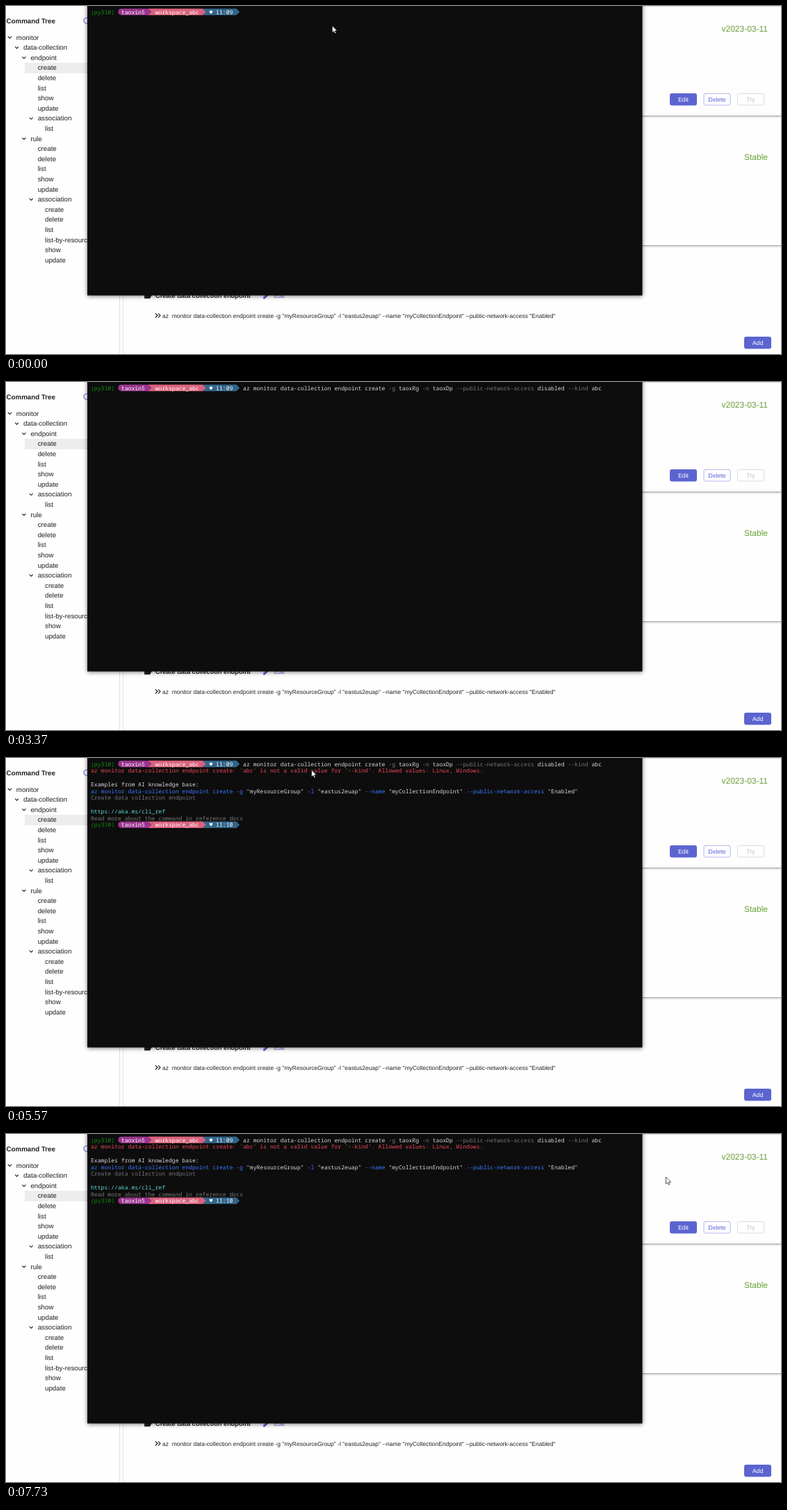
Recreate the animation shown at these times as an HTML page. Size 1115x502 px, loop 8000 ms.

```html
<!DOCTYPE html>
<html lang="en">
<head>
<meta charset="utf-8">
<title>Command tree and terminal</title>
<style>
  html, body { margin: 0; width: 100%; height: 100%; overflow: hidden; background: #fefefe; }
  svg { display: block; width: 1115px; height: 502px; }
  text { font-family: "Liberation Sans", Arial, sans-serif; white-space: pre; text-rendering: geometricPrecision; }
  #term text { font: 8.113px "Noto Sans Mono", "DejaVu Sans Mono", monospace; }
  #tree text { font-size: 9.75px; fill: #222; }
  #tree path, .line { fill: none; stroke: #222; stroke-width: 1.1; }
  .small { font-size: 8.8px; text-anchor: middle; }
  .tag { font-size: 12px; fill: #689f38; text-anchor: end; }
</style>
</head>
<body>
<svg viewBox="0 0 1115 502">
  <defs>
    <linearGradient id="fade" x2="0" y2="1">
      <stop stop-color="#999"/><stop offset=".4" stop-color="#ddd"/><stop offset="1" stop-color="#fefefe"/>
    </linearGradient>
    <filter id="shadow" x="-5%" y="-5%" width="110%" height="110%">
      <feDropShadow dx="0" dy="1" stdDeviation="3" flood-opacity=".55"/>
    </filter>
  </defs>

  <text x="0.5" y="24.5" font-size="9.75" font-weight="bold" fill="#222">Command Tree</text>
  <circle cx="116" cy="21" r="4" fill="none" stroke="#5c64d0" stroke-width="1.2"/>
  <rect x="27" y="82" width="136" height="15" fill="#ededed"/>
  <g id="tree"></g>
  <path d="M163.5 0V502M168.5 0V502" stroke="#e0e0e0"/>

  <g fill="url(#fade)">
    <rect x="169" y="0" width="946" height="2" opacity=".5"/>
    <rect x="169" y="158" width="946" height="4"/>
    <rect x="169" y="345" width="946" height="4"/>
  </g>
  <text class="tag" x="1096" y="37.3">v2023-03-11</text>
  <text class="tag" x="1096" y="222">Stable</text>
  <g id="buttons"></g>

  <path d="M199 413h8l3 4-3 5h-7q-1 0-1-1z" fill="#222"/>
  <text x="215" y="421" font-size="9.2" font-weight="bold" fill="#222">Create data collection endpoint</text>
  <path d="M370 422.500v-2.500l6-6 2.500 2.500-6 6z" fill="#5c64d0"/>
  <text class="small" x="393" y="421" fill="#5c64d0">Edit</text>
  <path class="line" d="M215 443.500l3 3-3 3M219 443.500l3 3-3 3"/>
  <text x="225" y="449.500" font-size="8.5" fill="#222">az  monitor data-collection endpoint create -g "myResourceGroup" -l "eastus2euap" --name "myCollectionEndpoint" --public-network-access "Enabled"</text>

  <rect x="117" y="-10" width="798.500" height="427.500" fill="#0c0c0c" filter="url(#shadow)"/>
  <g id="term"></g>
  <rect id="caret" width="1" height="10.500" fill="#eee"/>
  <path id="mouse" d="M0 0V10L2.300 7.900 3.800 11.200 5.400 10.500 3.900 7.300H7.100Z" fill="#fff" stroke="#111" stroke-width=".7"/>
</svg>
<script>
const $ = id => document.getElementById(id);

function add(parent, tag, attrs, text) {
  const el = document.createElementNS('http://www.w3.org/2000/svg', tag);
  for (const k in attrs) el.setAttribute(k, attrs[k]);
  if (text) el.textContent = text;
  return parent.appendChild(el);
}

// Command tree: leading dots give the depth, "+" marks an open branch
`+monitor
.+data-collection
..+endpoint
...create
...delete
...list
...show
...update
...+association
....list
..+rule
...create
...delete
...list
...show
...update
...+association
....create
....delete
....list
....list-by-resource
....show
....update`.split('\n').forEach((row, i) => {
  const [, dots, open, name] = row.match(/^(\.*)(\+?)(.*)/);
  const x = 14.8 + dots.length * 10.3, y = 45 + i * 14.6;
  add($('tree'), 'text', { x, y: y + 3.5 }, name);
  if (open) add($('tree'), 'path', { d: `M${x - 12} ${y - 1}l2.500 2.500 2.500-2.500` });
});

function button(x, y, label, fill, stroke, color) {
  add($('buttons'), 'rect', { x: x + .5, y: y + .5, width: 38, height: 16.5, rx: 2, fill, stroke });
  add($('buttons'), 'text', { class: 'small', x: x + 19.5, y: y + 12, fill: color }, label);
}
button(955, 126, 'Edit', '#5c64d0', '#5c64d0', '#fff');
button(1003.5, 126, 'Delete', '#fff', '#b4b8ea', '#5c64d0');
button(1052, 126, 'Try', '#fff', '#dcdcdc', '#bbb');
button(1062, 477, 'Add', '#5c64d0', '#5c64d0', '#fff');

// Terminal grid
const CW = 4.868, LH = 9.75, X0 = 122, Y0 = 4;
const colX = c => X0 + c * CW, rowY = r => Y0 + r * LH;
const WHITE = '#d6d6d6', GREY = '#767676', BLUE = '#3b78ff', RED = '#e74856', CYAN = '#61d6d6';
const parts = [];

// Part of the screen that is visible from a given time on
function since(time) {
  const g = add($('term'), 'g', {});
  parts.push([g, time]);
  return g;
}

function write(g, row, col, ...runs) {
  for (let i = 0; i < runs.length; i += 2) {
    add(g, 'text', { x: colX(col), y: rowY(row) + 7.5, fill: runs[i] }, runs[i + 1]);
    col += runs[i + 1].length;
  }
}

function prompt(g, row, clock) {
  const y = rowY(row) - .2, h = LH - .4, m = h / 2;
  const arrow = (from, to, fill) => add(g, 'path', {
    fill, d: `M${colX(from)} ${y}H${colX(to)}l${CW} ${m}l${-CW} ${m}H${colX(from)}z`
  });
  arrow(33, 43, '#33658a');
  arrow(17, 33, '#da627d');
  arrow(9, 17, '#9a348e');
  add(g, 'path', { fill: '#9a348e', d: `M${colX(9) + .2} ${y}a${CW} ${m} 0 0 0 0 ${h}z` });
  write(g, row, 0, '#13900e', '(py310)');
  write(g, row, 9, '#fff', 'taoxin5');
  write(g, row, 19, '#fff', 'workspace_abc');
  write(g, row, 35, '#fff', '♥ ' + clock);
}

const create = 'az monitor data-collection endpoint create';
prompt(since(0), 0, '11:09');
write(since(250), 0, 45, WHITE, create, GREY, ' -g', WHITE, ' taoxRg', GREY, ' -n', WHITE, ' taoxDp',
  GREY, ' --public-network-access', WHITE, ' disabled', GREY, ' --kind', WHITE, ' abc');
write(since(3840), 1, 0, RED, create + ": 'abc' is not a valid value for '--kind'. Allowed values: Linux, Windows.");
const help = since(3900);
write(help, 3, 0, WHITE, 'Examples from AI knowledge base:');
write(help, 4, 0, BLUE, create + ' -g', WHITE, ' "myResourceGroup"', BLUE, ' -l', WHITE, ' "eastus2euap"',
  BLUE, ' --name', WHITE, ' "myCollectionEndpoint"', BLUE, ' --public-network-access', WHITE, ' "Enabled"');
write(help, 5, 0, GREY, 'Create data collection endpoint');
write(help, 7, 0, CYAN, 'https://aka.ms/cli_ref');
write(help, 8, 0, GREY, 'Read more about the command in reference docs');
prompt(since(4180), 9, '11:10');

// Caret: on and off times alternate
const blinks = [320, 910, 1440, 2030, 2160, 2720, 3310, 3370,
  4240, 4460, 4990, 5520, 6080, 6700, 7190, 7730];
const caretCell = t => t < 2100 ? [45, 0] : t < 4000 ? [0, 1] : [45, 9];

// Pointer path: time, x, y
const path = [
  [0, 469.4, 28.5], [2160, 469.4, 28.5], [4710, 453.5, 31], [4830, 467, 31.5], [4989, 467, 31.5],
  [4990, 471.8, 32], [5050, 471.8, 32], [5290, 626, 26], [5570, 439.7, 17.3], [5629, 439.7, 17.3],
  [5750, 318.5, 22], [5840, 300, 24], [5960, 277.5, 26], [6300, 430.8, 22.3], [6359, 430.8, 22.3],
  [6600, 600, 25], [6700, 600, 25], [7390, 949.5, 62], [8000, 949.5, 62]
];

function pointer(t) {
  const i = path.findIndex(p => p[0] > t);
  const [t0, x0, y0] = path[i - 1], [t1, x1, y1] = path[i];
  const k = (t - t0) / (t1 - t0);
  return [x0 + (x1 - x0) * k, y0 + (y1 - y0) * k];
}

const show = (el, on) => el.setAttribute('visibility', on ? 'visible' : 'hidden');

function draw() {
  const t = performance.now() % 8000;
  for (const [g, time] of parts) show(g, t >= time);

  const [col, row] = caretCell(t);
  show($('caret'), blinks.filter(b => b <= t).length % 2);
  $('caret').setAttribute('x', Math.round(colX(col)));
  $('caret').setAttribute('y', rowY(row) - .6);

  show($('mouse'), t < 2160 || t >= 4710);
  $('mouse').setAttribute('transform', `translate(${pointer(t)})`);
  requestAnimationFrame(draw);
}
draw();
</script>
</body>
</html>
```
